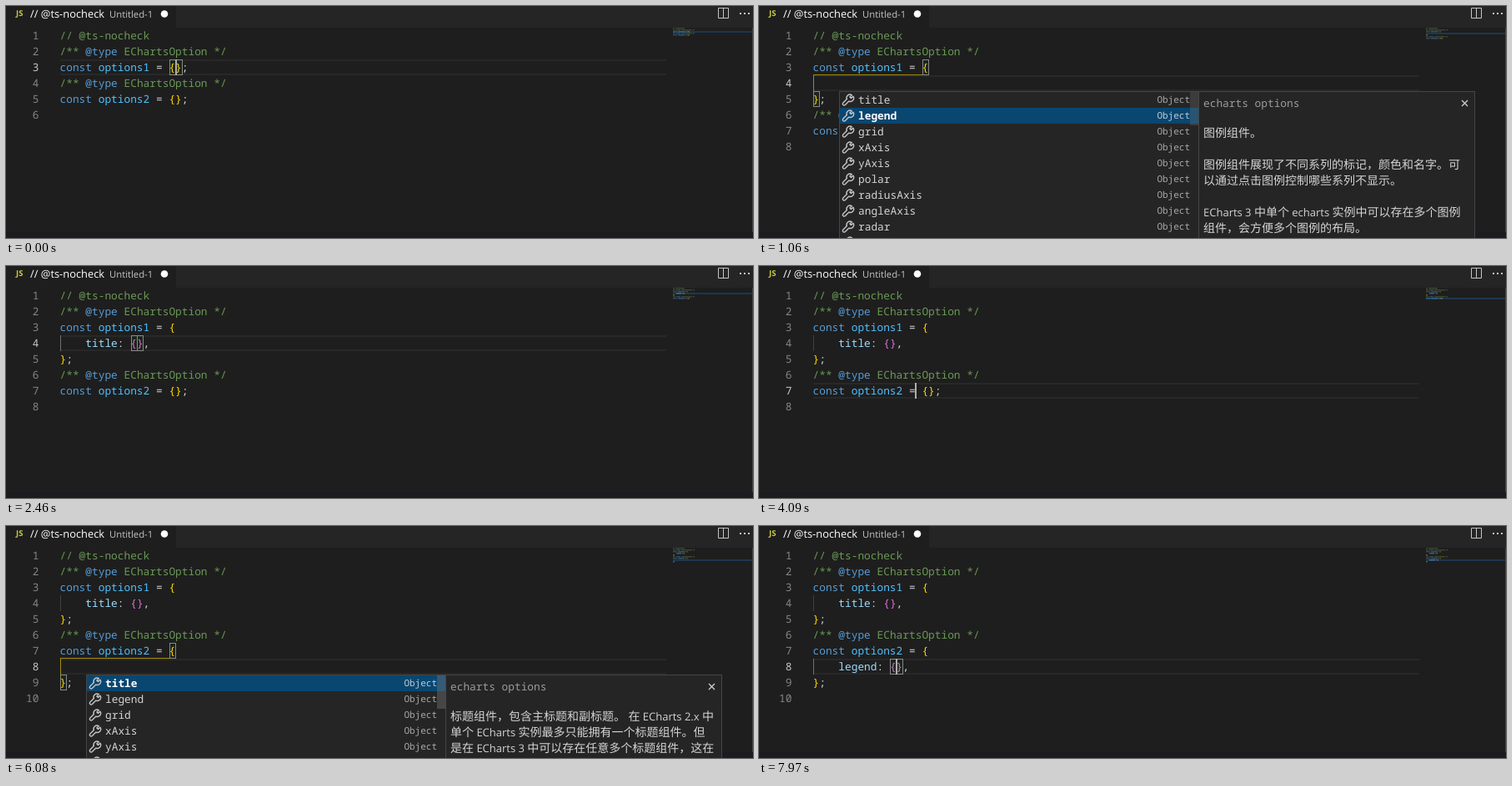
An HTML page that plays this animation: 896 px wide and 278 px high, repeating every 8 s.

```html
<!DOCTYPE html>
<html lang="zh-CN">
<head>
<meta charset="utf-8">
<title>Editor completion</title>
<style>
html, body { margin: 0; width: 100%; height: 100%; overflow: hidden; background: #1e1e1e; }
svg { display: block; }
text { white-space: pre; text-rendering: geometricPrecision; }
.code { font: 12.833px "Noto Sans Mono", "DejaVu Sans Mono", monospace; }
.type { font-size: 11px; }
.ui { font-family: "Open Sans", "Noto Sans", sans-serif; }
.doc { font: 14px "Noto Sans CJK SC", "Noto Sans CJK", "Noto Sans", sans-serif; fill: #d4d4d4; }
.latin { font-family: "Open Sans", "Noto Sans", sans-serif; font-size: 13px; }
.bold { font-weight: 700; }
.link { fill: #3794ff; }
</style>
</head>
<body>
<svg xmlns="http://www.w3.org/2000/svg" width="896" height="278" viewBox="0 0 896 278">
  <rect width="896" height="278" fill="#1e1e1e"/>
  <rect x="204" width="692" height="26" fill="#252526"/>
  <g class="ui">
    <text x="12" y="12" font-size="9.5" font-weight="700" fill="#cbcb41">JS</text>
    <text x="29" y="14" font-size="12.9" fill="#fff">// @ts-nocheck</text>
    <text x="124" y="14" font-size="11.3" fill="#c4c4c4">Untitled-1</text>
  </g>
  <circle cx="190" cy="9.5" r="4.3" fill="#fff"/>
  <path d="M854.5 2.5h12v12h-12zM860.5 2.5v12" fill="none" stroke="#c5c5c5"/>
  <path d="M880 9h2m3 0h2m3 0h2" stroke="#c5c5c5" stroke-width="2"/>
  <path d="M895.5 26V271" stroke="#434343"/>
  <rect y="271" width="896" height="7" fill="#1b1b20"/>
  <g id="view"></g>
</svg>
<script>
const LOOP = 8000, LEFT = 64.5, CHAR = 7.7, TOP = 26, ROW = 19;
const C = {
  comment: '#6a9955', key: '#569cd6', name: '#4fc1ff', prop: '#9cdcfe',
  plain: '#d4d4d4', outer: '#ffd700', inner: '#da70d6'
};
const items = ['title', 'legend', 'grid', 'xAxis', 'yAxis', 'polar', 'radiusAxis', 'angleAxis', 'radar', 'dataZoom'];
const docs = [
  ['标题组件，包含主标题和副标题。 在 ECharts 2.x 中',
   '单个 ECharts 实例最多只能拥有一个标题组件。但',
   '是在 ECharts 3 中可以存在任意多个标题组件，这在',
   '需要标题进行排版，或者单个实例中的多个图表都',
   '需要标题时会比较有用。 **例如下面不同缓动函数效**',
   '**果的示例，每一个缓动效果图都带有一个标题组**',
   '**件：**'],
  ['图例组件。', '',
   '图例组件展现了不同系列的标记，颜色和名字。可',
   '以通过点击图例控制哪些系列不显示。', '',
   'ECharts 3 中单个 echarts 实例中可以存在多个图例',
   '组件，会方便多个图例的布局。'],
  ['直角坐标系内绘图网格，单个 grid 内最多可以放置',
   '上下两个 X 轴，左右两个 Y 轴。可以在网格上绘制',
   '[折线图]，[柱状图]，[散点图（气泡图）]。 在 ECharts',
   '2.x 里单个 ECharts 实例中最多只能存在一个 grid',
   '组件，在 ECharts 3 中可以存在任意多个 grid 组',
   '件。'],
  ['直角坐标系 grid 中的 x 轴，一般情况下单个 grid',
   '组件最多只能放上下两个 x 轴，多于两个 x 轴需要',
   '通过配置 offset 属性防止同个位置多个 x 轴的重叠。']
];

// Each step overrides the fields of the one before it.
// one, two: object bodies (null = inline); pair: matched brackets as [line, col]
const steps = [
  { t: 0, one: null, two: null, line: 3, col: 18, caret: true, pick: -1, pair: [[3, 17], [3, 18]] },
  { t: 120, one: '', line: 4, col: 4, pair: [[3, 17], [5, 0]] },
  { t: 270, pick: 0, opened: 270 },
  { t: 670, caret: false },
  { t: 940, pick: 1 },
  { t: 1080, pick: 2 },
  { t: 1210, pick: 1, caret: true },
  { t: 1360, pick: 0 },
  { t: 1630, caret: false },
  { t: 1910, one: 'title', pick: -1, col: 12, caret: true, pair: [] },
  { t: 2060, pair: [[4, 11], [4, 12]] },
  { t: 2460, caret: false },
  { t: 2860, caret: true, col: 13 },
  { t: 3000, line: 5, col: 2, pair: [] },
  { t: 3140, line: 6 },
  { t: 3280, line: 7 },
  { t: 3690, col: 5 },
  { t: 3830, col: 14 },
  { t: 4090, col: 16 },
  { t: 4520, caret: false },
  { t: 4650, caret: true, col: 17, pair: [[7, 17], [7, 18]] },
  { t: 4790, col: 18 },
  { t: 5320, caret: false },
  { t: 5590, two: '', line: 8, col: 4, caret: true, pick: 0, opened: 5590, pair: [[7, 17], [9, 0]] },
  { t: 6080, caret: false },
  { t: 6350, pick: 2 },
  { t: 6470, pick: 3, caret: true },
  { t: 6860, pick: 2 },
  { t: 7010, pick: 1, caret: false },
  { t: 7450, caret: true },
  { t: 7850, two: 'legend', pick: -1, col: 12, pair: [] },
  { t: 7970, col: 13, pair: [[8, 12], [8, 13]] }
];
const states = [];
steps.forEach((s, i) => states.push({ ...states[i - 1], ...s }));

const xAt = col => LEFT + col * CHAR;
const yAt = line => TOP + (line - 1) * ROW;
const rect = (x, y, w, h, fill, more = '') =>
  `<rect x="${x}" y="${y}" width="${w}" height="${h}" fill="${fill}" ${more}/>`;
const text = (x, y, str, fill, cls = 'code', more = '') =>
  `<text class="${cls}" x="${x}" y="${y}" fill="${fill}" ${more}>${str}</text>`;
const stroke = (d, color, width = 1) =>
  `<path d="${d}" fill="none" stroke="${color}" stroke-width="${width}"/>`;

function block(name, body) {
  const head = [['const ', C.key], [name, C.name], [' = ', C.plain]];
  const tail = [['}', C.outer], [';', C.plain]];
  const note = [['/** ', C.comment], ['@type', C.key], [' EChartsOption */', C.comment]];
  if (body === null) return [note, [...head, ['{', C.outer], ...tail]];
  const inside = body
    ? [['    ', C.plain], [body, C.prop], [': ', C.plain], ['{}', C.inner], [',', C.plain]]
    : [];
  return [note, [...head, ['{', C.outer]], inside, tail];
}

const source = s => [
  [['// @ts-nocheck', C.comment]],
  ...block('options1', s.one), ...block('options2', s.two), []
];

function editor(s) {
  const y = yAt(s.line);
  let out = stroke(`M65 ${y + 1}H792M65 ${y + ROW - 1}H792`, '#282828', 2);
  out += rect(800, TOP + (s.line - 1) * 2, 95, 2, '#1d3750');

  const guides = [];
  if (s.one !== null) guides.push(4);
  if (s.two !== null) guides.push(8);
  for (const line of guides) {
    const open = s.pair.length && s.pair[0][0] === line - 1 && s.pair[1][0] === line + 1;
    const color = open ? '#a38c0c' : line === s.line ? '#707070' : '#404040';
    out += stroke(`M65.5 ${yAt(line)}v${ROW}`, color);
    if (open) out += stroke(`M65 ${yAt(line) - .5}H196`, color);
  }
  for (const [line, col] of s.pair) {
    out += rect(Math.ceil(xAt(col)) + .5, yAt(line) + .5, 7, ROW - 1, 'rgba(0,100,0,.1)', 'stroke="#888"');
  }

  source(s).forEach((tokens, i) => {
    const base = yAt(i + 1) + 14;
    const active = i + 1 === s.line;
    out += text(39.5, base, i + 1, active ? '#c6c6c6' : '#858585', 'code', 'text-anchor="end"');
    let col = 0;
    for (const [str, color] of tokens) {
      for (const m of str.matchAll(/\S+/g)) {
        const at = col + m.index;
        out += text(xAt(at).toFixed(2), base, m[0], color);
        out += rect(800 + at, TOP + i * 2, m[0].length, 1.5, color, 'opacity=".33"');
      }
      col += str.length;
    }
  });
  if (s.caret) out += rect(Math.floor(xAt(s.col)), y, 2, ROW, '#aeafad');
  return out;
}

const wrench = (x, y) =>
  `<g transform="translate(${x} ${y})" fill="none" stroke="#c5c5c5" stroke-width="1.4" stroke-linejoin="round">
  <path d="M11.3 1.2A4 4 0 0 0 5.4 6.1L.9 10.6a1.7 1.7 0 0 0 2.5 2.5L7.9 8.6a4 4 0 0 0 5-5.9L10.5 5.1 8.9 3.5z"/></g>`;

function rich(line) {
  const latin = str => str.replace(/[\x20-\x7e]+/g, m => `<tspan class="latin">${m}</tspan>`);
  return line.split(/(\*\*.*?\*\*|\[.*?\])/).map(part => {
    if (part.startsWith('**')) return `<tspan class="bold">${latin(part.slice(2, -2))}</tspan>`;
    if (part.startsWith('[')) return `<tspan class="link">${latin(part.slice(1, -1))}</tspan>`;
    return latin(part);
  }).join('');
}

// The list's scrollbar fades away shortly after opening.
const barOpacity = age => Math.min(1, Math.max(0, 1 - (age - 500) / 590));

function popup(s) {
  const top = yAt(s.line + 1);
  const frame = 'stroke="#454545"';
  let out = rect(96.5, top + .5, 431, 240, '#252526', frame);
  out += rect(527.5, top + .5, 331, 240, '#252526', frame);
  items.forEach((label, i) => {
    const y = top + 1 + i * ROW;
    const on = i === s.pick;
    if (on) out += rect(97, y, 430, ROW, '#094771');
    out += wrench(100, y + 2.5);
    out += text(119, y + 14, label, on ? '#fff' : C.plain, on ? 'code bold' : 'code');
    out += text(517, y + 13, 'Object', on ? '#c0ccd6' : '#a8a8a8', 'code type', 'text-anchor="end"');
  });
  out += rect(517, top + 1, 10, 40, 'rgba(121,121,121,.4)', `opacity="${barOpacity(s.t - s.opened)}"`);
  out += text(533, top + 19, 'echarts options', '#9c9c9c');
  out += stroke(`M843 ${top + 11}l7 7m0 -7l-7 7`, '#d0d0d0', 1.3);
  docs[s.pick].forEach((line, i) => {
    out += `<text class="doc" x="533" y="${top + 55 + i * ROW}">${rich(line)}</text>`;
  });
  return out;
}

const view = document.getElementById('view');
let shown = null;

function draw(time) {
  const now = time % LOOP;
  const s = states.findLast(state => state.t <= now);
  if (s === shown) return;
  shown = s;
  view.innerHTML = editor(s) + (s.pick < 0 ? '' : popup(s));
}

const start = performance.now();
function tick() {
  draw(performance.now() - start);
  requestAnimationFrame(tick);
}
tick();
</script>
</body>
</html>
```
